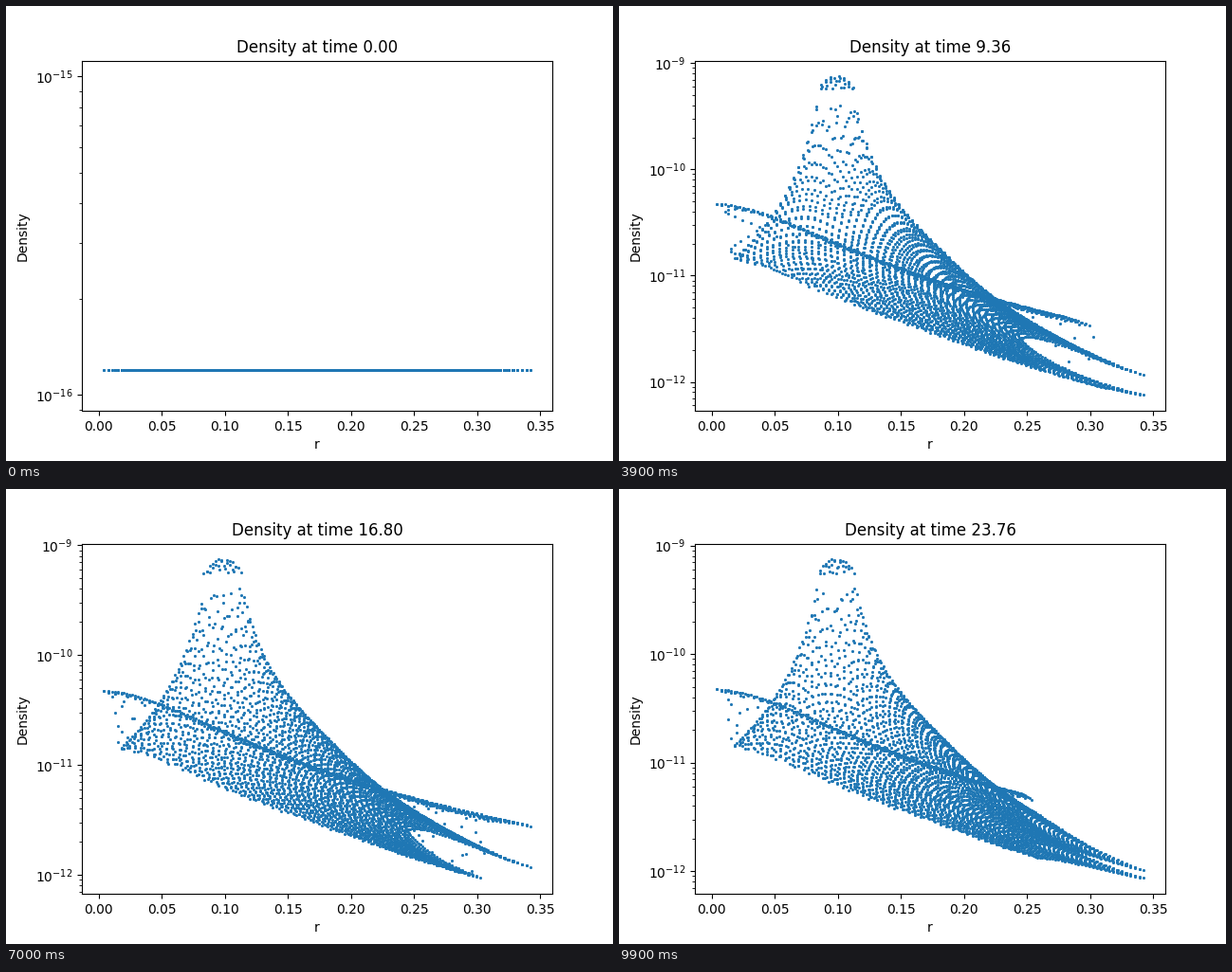
These frames come from a looping animation (640 by 480 pixels, 10000 ms). A matplotlib script:

```python
import numpy as np
import matplotlib.pyplot as plt
from matplotlib.animation import FuncAnimation

FRAMES = 100
STEP = 0.24            # simulated time per frame
CELLS = 96
CELL = 0.5 / 98
ORBIT = 0.0985         # orbital radius of each of the two stars
OMEGA = np.radians(26.63) / STEP
LAG = 1.07             # orbital angle the wind trails by, per unit distance
AMBIENT = 1.2e-16
CORE = 0.0155          # radius of a star's dense core
WIND = 0.95e-13        # wind density times distance squared

axis = CELL * (np.arange(CELLS) - (CELLS - 1) / 2)
X, Y = (a.ravel() for a in np.meshgrid(axis, axis))
R = np.hypot(X, Y)
SHOCK = 4.75e-11 / (1 + (R / 0.086)**2)


def smooth(u):
    u = np.clip(u, 0, 1)
    return u * u * (3 - 2 * u)


def wind_distance(angle):
    """Distance to the star's position when the local wind left it."""
    d = np.zeros_like(R)
    for _ in range(6):
        a = angle - LAG * d
        d = np.hypot(X - ORBIT * np.cos(a), Y - ORBIT * np.sin(a))
    return d


def star_density(d, facing):
    """Dense core inside an inverse-square wind, stronger just outside the orbit."""
    bulge = 0.3 * facing * np.exp(-((R - 0.17) / 0.04)**2)
    fade = 0.26 * np.sqrt(facing) * smooth((R - 0.2) / 0.14)
    wind = WIND * (1 + bulge - fade) / np.maximum(d, CORE)**2
    core = 7.6e-10 * np.exp(-(d / 0.027)**2)
    return np.where(d < CORE, core, wind)


def density(t):
    if t == 0:
        return np.full_like(R, AMBIENT)
    d1 = wind_distance(OMEGA * t)
    d2 = wind_distance(OMEGA * t + np.pi)
    near, far = np.minimum(d1, d2), np.maximum(d1, d2)
    facing = np.clip((far**2 - near**2) / (4 * ORBIT * R), 0, 1)
    wind = star_density(near, facing)

    # the shocked layer between the winds widens away from the stars
    offset = near * (far - near) / (2 * ORBIT)
    width = 0.133 * near
    shock = SHOCK * (1 - 0.09 * np.clip(offset / width, 0, 1)**2)
    mix = smooth((width + 0.003 - offset) / 0.006)
    return wind * (shock / wind)**mix


fig, ax = plt.subplots(figsize=(6.4, 4.8), dpi=100)
ax.set_yscale("log")
ax.set_xlabel("r")
ax.set_ylabel("Density")
dots, = ax.plot(R, density(0), ".", markersize=2)
title = ax.set_title("")


def update(i):
    t = STEP * i
    dots.set_data(R, density(t))
    ax.relim()
    ax.autoscale_view()
    title.set_text(f"Density at time {t:.2f}")
    return dots, title


anim = FuncAnimation(fig, update, frames=FRAMES, interval=100,
                     repeat=True, repeat_delay=0, blit=False)
plt.show()
```
